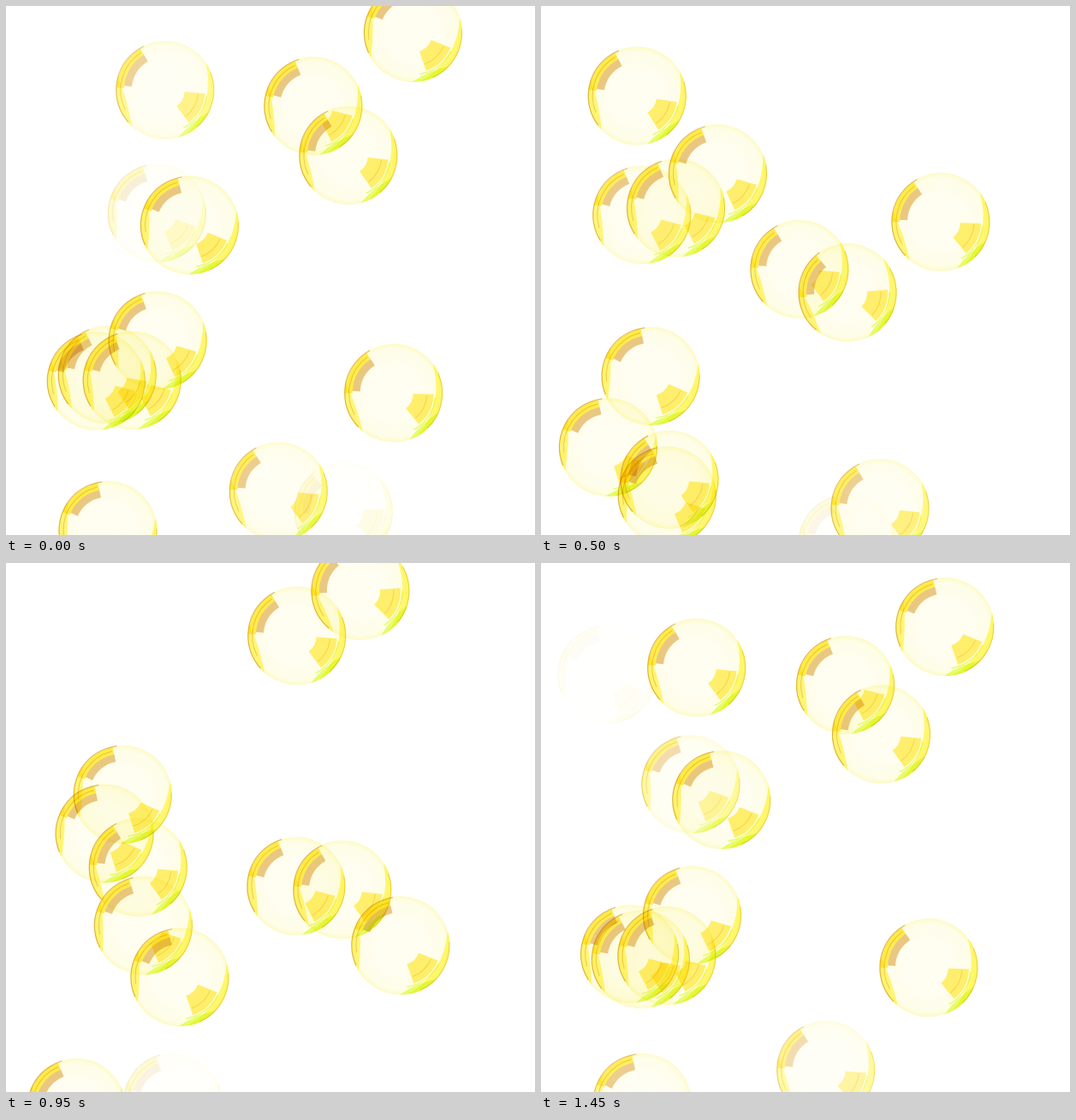
Animation of 618 by 618 pixels, one loop 1500 ms. Source, as an HTML page with a canvas:

```html
<!DOCTYPE html>
<html lang="en">
<head>
<meta charset="utf-8">
<title>Bubbles</title>
<style>
  html, body { margin: 0; width: 100%; height: 100%; overflow: hidden; background: #fff; }
  canvas { display: block; }
</style>
</head>
<body>
<canvas id="stage" width="618" height="618"></canvas>
<script>
const ctx = document.getElementById('stage').getContext('2d');
const SIZE = 618, LOOP = 1500, STEP = 50;
const R = 57.5, LIFE = 1380, FADE_IN = 180, FADE_OUT = 150, MARGIN = 150;
const bubbles = [];

const clamp = v => Math.max(0, Math.min(1, v));
const rad = deg => deg * Math.PI / 180;

// The points are spread evenly over the bubble's life
const bubble = (born, tilt, ...path) => bubbles.push({ born, tilt, path });

bubble(1060, 31, [459, 589], [453, 422], [464, 278], [488, 72]);
bubble(1340, 33, [321, 572], [290, 382], [327, 194], [331, 22]);
bubble(1470, 25, [367, 541], [357, 343], [402, 100], [430, -155]);
bubble(1290, 53, [118, 634], [138, 238]);
bubble(80, 53, [82, 609], [85, 475], [116, 310], [103, 165]);
bubble(1250, 38, [114, 495], [115, 138], [60, -230]);
bubble(760, 43, [80, 650], [104, 453], [118, 240]);
bubble(955, 43, [149, 615], [149, 372], [166, 161]);
bubble(910, 45, [187, 580], [180, 346], [225, 138]);
bubble(165, 48, [142, 633], [174, 270]);
bubble(240, 34, [152, 600], [154, 360], [185, 103]);
bubble(565, 51, [217, 582], [202, 353], [249, 127]);
bubble(470, 43, [349, 552], [339, 360], [350, 190], [376, -9]);
bubble(345, 35, [396, 590], [394, 412], [392, 291], [406, 119]);
bubble(690, 51, [465, 514], [468, 125], [529, -397]);

// Smooth polynomial through all points (Lagrange)
function place(path, age) {
  const last = path.length - 1;
  const u = (age - MARGIN) / (LIFE - 20 - 2 * MARGIN + 40) * last;
  let x = 0, y = 0;
  path.forEach(([px, py], i) => {
    let w = 1;
    for (let j = 0; j <= last; j++) if (j !== i) w *= (u - j) / (i - j);
    x += px * w;
    y += py * w;
  });
  return [x, y];
}

function band(r0, r1, from, to, color) {
  ctx.beginPath();
  ctx.arc(0, 0, r1, rad(from), rad(to));
  ctx.arc(0, 0, r0, rad(to), rad(from), true);
  ctx.closePath();
  ctx.fillStyle = color;
  ctx.fill();
}

// Band that thins out to nothing at both ends
function crescent(r0, from, to, color) {
  const mid = rad((from + to) / 2), end = rad(to);
  const q = 2 * r0 - R * Math.cos(end - mid);
  ctx.beginPath();
  ctx.arc(0, 0, R, rad(from), end);
  ctx.quadraticCurveTo(q * Math.cos(mid), q * Math.sin(mid),
    R * Math.cos(rad(from)), R * Math.sin(rad(from)));
  ctx.fillStyle = color;
  ctx.fill();
}

function arc(r, from, to, color, width = 1) {
  ctx.beginPath();
  ctx.arc(0, 0, r, rad(from), rad(to));
  ctx.strokeStyle = color;
  ctx.lineWidth = width;
  ctx.stroke();
}

const film = ctx.createRadialGradient(0, 0, R * .5, 0, 0, R);
film.addColorStop(0, 'rgba(252,248,190,.22)');
film.addColorStop(.8, 'rgba(252,248,170,.28)');
film.addColorStop(1, 'rgba(252,244,120,.45)');

function draw(x, y, tilt, alpha) {
  ctx.save();
  ctx.translate(x, y);
  ctx.rotate(rad(tilt));
  ctx.globalAlpha = alpha;
  ctx.globalCompositeOperation = 'multiply';
  band(0, R, 0, 360, film);

  // left rim and window reflection
  crescent(47, 98, 162, 'rgba(255,244,80,.7)');
  band(48, R - 1, 149, 205, 'rgba(255,236,64,.9)');
  band(39, 48, 152, 205, 'rgba(232,192,120,.85)');
  arc(52, 120, 203, 'rgba(232,192,110,.7)');
  arc(R - .5, 105, 210, 'rgba(222,184,120,.9)', 1.2);

  // right rim and its inner reflection
  crescent(49, -68, 30, 'rgba(255,248,90,.8)');
  crescent(50, -8, 40, 'rgba(225,255,90,.8)');
  band(23, 47, -29, 20, 'rgba(255,236,80,.8)');
  arc(49, -25, 30, 'rgba(232,250,90,.8)', 1.5);
  arc(39, -27, 18, 'rgba(236,200,100,.5)');
  arc(R - .5, -55, 15, 'rgba(230,200,110,.7)');
  ctx.restore();
}

function frame(now) {
  const t = Math.floor((now % LOOP) / STEP) * STEP;
  ctx.fillStyle = '#fff';
  ctx.fillRect(0, 0, SIZE, SIZE);
  for (const { born, tilt, path } of bubbles) {
    const age = (t - born + LOOP) % LOOP;
    const alpha = clamp(age / FADE_IN) * clamp((LIFE - age) / FADE_OUT);
    if (alpha > 0) draw(...place(path, age), tilt, alpha);
  }
}

const start = performance.now();
function tick() {
  frame(performance.now() - start);
  requestAnimationFrame(tick);
}
tick();
</script>
</body>
</html>
```
